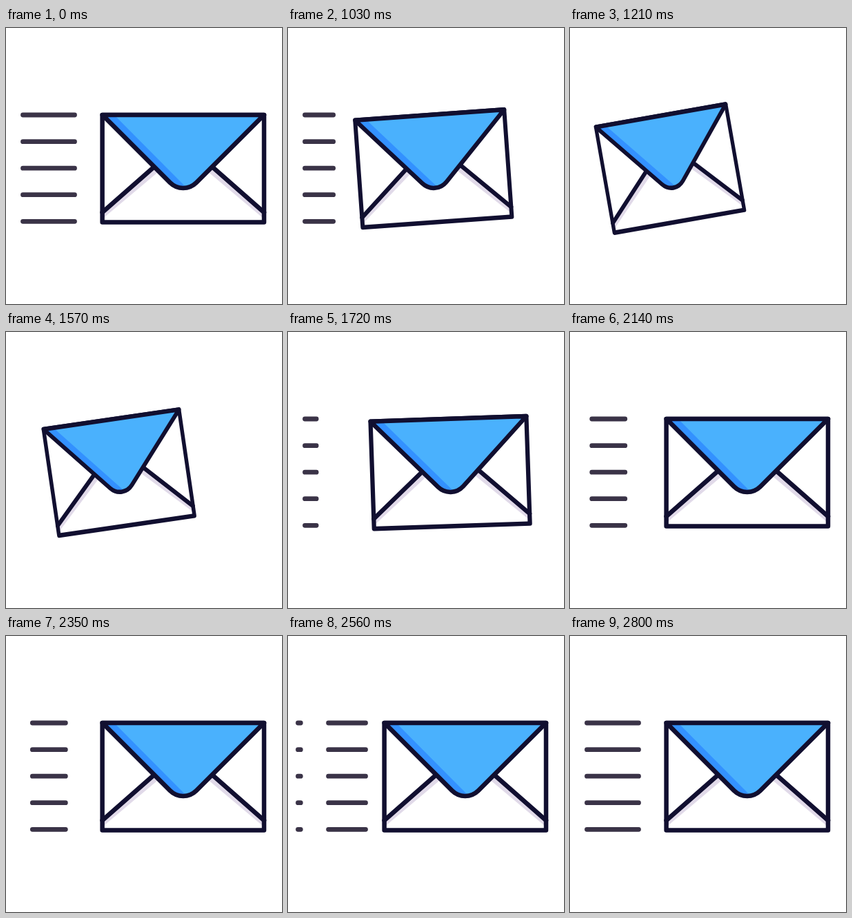
An HTML page that plays this animation: 400x400 px, repeating every 2830 ms.

```html
<!DOCTYPE html>
<html lang="en">
<head>
<meta charset="utf-8">
<title>Sending mail</title>
<style>
  html, body { margin: 0; width: 100%; height: 100%; overflow: hidden; background: #fff; }
  svg { display: block; width: 100%; height: 100%; fill: none; stroke-linecap: round; stroke-linejoin: round; }
</style>
</head>
<body>
<svg viewBox="0 0 400 400">
  <path id="lines" stroke="#3a3347" stroke-width="6.8"/>
  <!-- the envelope is drawn around its centre -->
  <g id="mail" stroke="#110f30" stroke-width="6.5">
    <path fill="#fff" stroke="none" d="M-117.2-77.8h234.4v155.5h-234.4z"/>
    <path fill="#e1dae9" stroke="none" d="M-117.2 63L-43-4L-34 3L-117.2 73zM117.2 63L43-4L34 3L117.2 73z"/>
    <path d="M-117.2 63.5L-41-3.5M117.2 63.5L41-3.5"/>
    <path d="M-117.2-77.8h234.4v155.5h-234.4z"/>
    <path fill="#3391ff" stroke="none" d="M-117.2-77.8L-19 20.4A27 27 0 0 0 19 20.4L117.2-77.8z"/>
    <path fill="#4ab1fd" stroke="none" d="M-100-77.8L5 28L19 20.4L117.2-77.8z"/>
    <path d="M-117.2-77.8L-19 20.4A27 27 0 0 0 19 20.4L117.2-77.8z"/>
  </g>
</svg>
<script>
const LOOP = 2830, PAUSE = 1030, STEP = 30;
const LEFT = 14.5, SPAN = 98;
const rows = [126, 164.7, 203.2, 241.7, 280.3];
const mail = document.getElementById('mail');
const lines = document.getElementById('lines');

function ease(t, start, duration) {
  const u = Math.min(1, Math.max(0, (t - start) / duration));
  return (1 - Math.cos(Math.PI * u)) / 2;
}

// A dash that leaves one end of the track comes back in at the other.
function dashes(offset, length) {
  if (length < 0.1) return '';
  const start = ((offset % SPAN) + SPAN) % SPAN;
  const end = start + length;
  const parts = [[start, Math.min(end, SPAN)]];
  if (end > SPAN) parts.push([0, end - SPAN]);
  return rows.map(y => parts.map(([a, b]) => `M${LEFT + a} ${y}H${LEFT + b}`).join('')).join('');
}

function draw(t) {
  const out = ease(t, 879, 341);
  const pull = out - ease(t, 1478, 341);
  mail.setAttribute('transform',
    `translate(${256.8 - 112 * pull} 203.7) rotate(${-10 * pull}) scale(${1 - 0.185 * pull} 1)`);

  const length = 75 * Math.max(0, 1 - 1.1 * out)
    + 48 * ease(t, 1600, 300) + 27 * ease(t, 2400, 390);
  const offset = 10 - 3 * SPAN * ease(t, 1750, 1040);
  lines.setAttribute('d', dashes(offset, length));
}

function tick() {
  const t = performance.now() % LOOP;
  draw(t < PAUSE ? 0 : PAUSE + Math.floor((t - PAUSE) / STEP) * STEP);
  requestAnimationFrame(tick);
}
tick();
</script>
</body>
</html>
```
